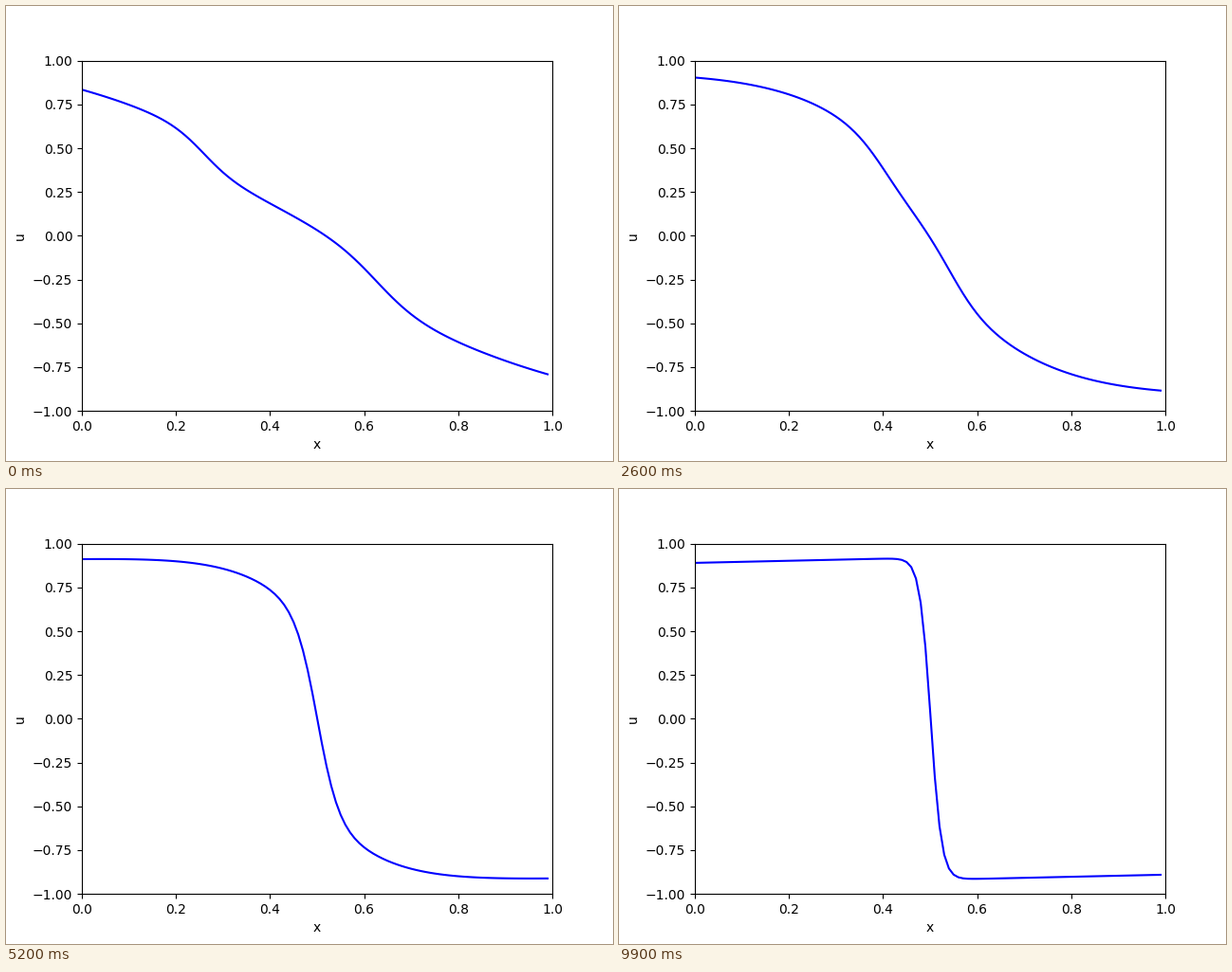
A matplotlib script for the animation above (10000 ms loop, 640 px wide and 480 px high).

```python
import numpy as np
import matplotlib.pyplot as plt
from matplotlib.animation import FuncAnimation

FRAMES, INTERVAL = 100, 100

# Strength of the broad slope and of the two sharp fronts over the loop
KEYS = [0, 16, 36, 52, 68, 84, 99]
BROAD = [.85, .75, .565, .38, .127, .04, 0]
SHARP = [.252, .20, .37, .56, .81, .89, .92]

x = np.arange(100) / 100


def ramp(v):
    return np.clip(v, 0, 1)


def smooth(v):
    v = ramp(v)
    return v * v * (3 - 2 * v)


def step(height, steepness, centre):
    return -height * np.tanh(steepness * (x - centre))


def wave(n):
    """Two fronts on a broad slope run together and steepen into one shock."""
    mid = .5 + .0012 * (n / 99)**2
    left = mid - .242 * (1 - ramp(n / 39)**1.35)
    right = mid + .128 * (1 - ramp(n / 45)**.8)

    sharp = np.interp(n, KEYS, SHARP)
    k = 14.5 + 28.5 * smooth((n - 28) / 71)
    u = step(np.interp(n, KEYS, BROAD), 1.6 + .077 * n, mid)
    u += step(.44 * sharp, k, left)
    u += step(.56 * sharp, k * min(1, .75 + n / 64), right)

    # Slight early lift, and a late tilt of the plateaus
    return u + .018 * ramp(1 - n / 50) + .06 * ramp(n / 60) * (x - .5)


fig, ax = plt.subplots(figsize=(6.4, 4.8), dpi=100)
ax.set(xlim=(0, 1), ylim=(-1, 1), xlabel="x", ylabel="u")
line, = ax.plot(x, wave(0), color="blue", lw=1.5)


def update(n):
    line.set_ydata(wave(n))
    return line,


anim = FuncAnimation(fig, update, frames=FRAMES, interval=INTERVAL,
                     repeat=True, repeat_delay=0)
plt.show()
```
